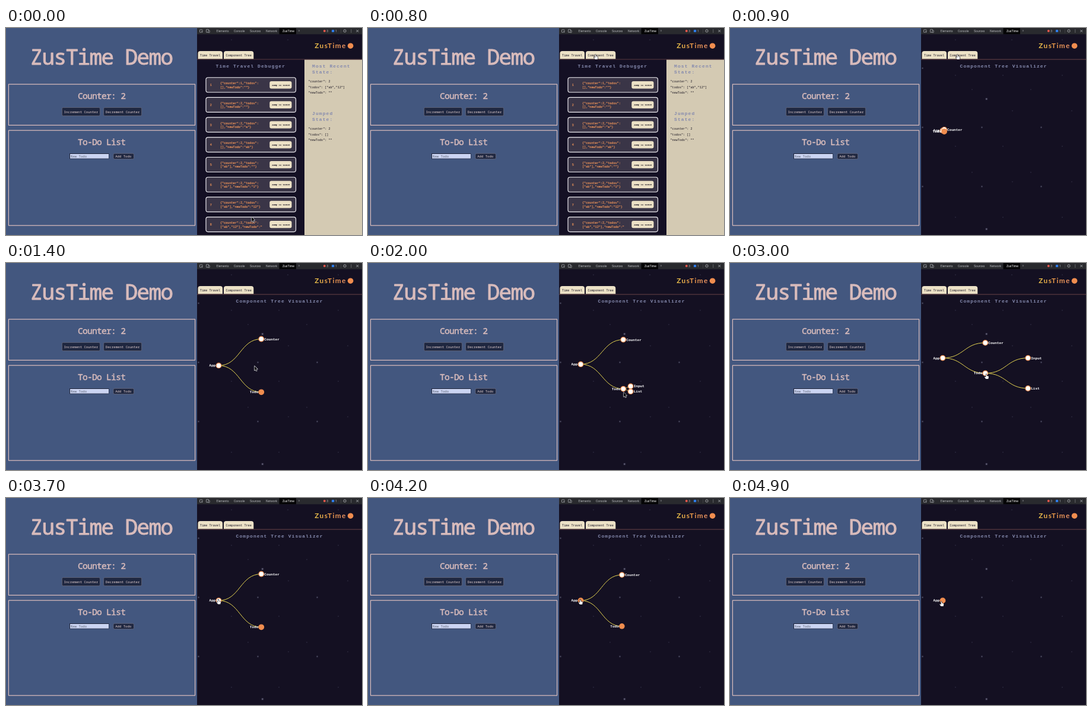
These frames come from a looping animation (600x350 px, 5 s). An HTML page with a canvas:

```html
<!DOCTYPE html>
<html lang="en">
<head>
<meta charset="utf-8">
<title>ZusTime Demo</title>
<style>
  html, body { margin: 0; width: 100%; height: 100%; overflow: hidden; background: #43577f; }
  canvas { display: block; width: 600px; height: 350px; }
</style>
</head>
<body>
<canvas id="stage"></canvas>
<script>
const LOOP = 5000, SWITCH = 850, MOVE = 500;
const MONO = '"Noto Sans Mono", monospace';
const COURIER = '"Liberation Mono", monospace';
const SANS = 'Roboto, sans-serif';
const PINK = '#d9bcbc', CREAM = '#ece1c6', ORANGE = '#f08d4f', NIGHT = '#141022', HEAD = '#858aae';

const canvas = document.getElementById('stage');
const ctx = canvas.getContext('2d');
const dpr = window.devicePixelRatio || 1;
canvas.width = 600 * dpr;
canvas.height = 350 * dpr;

function rect(x, y, w, h, fill) {
  ctx.fillStyle = fill;
  ctx.fillRect(x, y, w, h);
}

function box(x, y, w, h, r, fill, stroke, line = 1) {
  ctx.beginPath();
  ctx.roundRect(x, y, w, h, r);
  if (fill) { ctx.fillStyle = fill; ctx.fill(); }
  if (stroke) { ctx.strokeStyle = stroke; ctx.lineWidth = line; ctx.stroke(); }
}

function dot(x, y, r, fill, stroke) {
  ctx.beginPath();
  ctx.arc(x, y, r, 0, Math.PI * 2);
  ctx.fillStyle = fill;
  ctx.fill();
  if (stroke) { ctx.strokeStyle = stroke; ctx.lineWidth = 1.2; ctx.stroke(); }
}

// `thick` outlines the glyphs for weights between regular and bold
function text(str, x, y, font, fill, { align = 'left', gap = 0, thick = 0 } = {}) {
  ctx.font = font;
  ctx.textAlign = align;
  ctx.letterSpacing = gap + 'px';
  ctx.fillStyle = fill;
  ctx.fillText(str, x, y);
  if (!thick) return;
  ctx.lineJoin = 'round';
  ctx.lineWidth = thick;
  ctx.strokeStyle = fill;
  ctx.strokeText(str, x, y);
}

function path(points, x, y, fill, stroke) {
  ctx.beginPath();
  points.forEach(([px, py]) => ctx.lineTo(x + px, y + py));
  ctx.closePath();
  ctx.lineJoin = 'round';
  ctx.strokeStyle = stroke;
  ctx.lineWidth = 1.2;
  ctx.stroke();
  ctx.fillStyle = fill;
  ctx.fill();
}

// Demo page

function pageButton(label, x, y, w, h) {
  box(x, y, w, h, 2, '#1f2740', '#66687a', 0.8);
  text(label, x + 3.2, y + h / 2 + 2, '5.65px ' + MONO, '#e2cfcf');
}

function section(label, y, h) {
  box(4.4, y, 314.2, h, 0, null, PINK, 1.2);
  text(label, 121, y + 25.3, '14.6px ' + MONO, PINK, { gap: -0.74, thick: 0.45 });
}

function drawPage() {
  rect(0, 0, 322, 350, '#43577f');
  text('ZusTime Demo', 40.5, 61.8, '36px ' + MONO, PINK, { gap: -1.6, thick: 0.9 });
  section('Counter: 2', 95.1, 69.2);
  pageButton('Increment Counter', 94.4, 134.5, 64, 14);
  pageButton('Decrement Counter', 164.6, 134.5, 64, 14);
  section('To-Do List', 173.1, 160.7);
  rect(107, 212, 66.5, 9.3, '#20263c');
  rect(108, 213, 65, 7.6, '#cbd4f2');
  text('New Todo', 109, 219, '5.65px ' + MONO, '#5f6678');
  pageButton('Add Todo', 181, 212.2, 34.5, 9.4);
}

// Panel frame

function drawToolbar() {
  rect(322, 0, 278, 10.5, '#292a2e');
  rect(460.5, 0, 28.5, 10.5, '#050506');
  const font = '5.1px ' + SANS, grey = '#b4b6ba';
  [['Elements', 354.5], ['Console', 384], ['Sources', 411], ['Network', 438]]
    .forEach(([label, x]) => text(label, x, 6.8, font, grey));
  text('ZusTime', 466, 6.8, font, '#ffffff');
  text('»', 492.3, 6.8, '6.5px ' + SANS, '#85878b');
  box(326.5, 2.8, 4.5, 4.5, 0.5, null, grey, 0.7);
  path([[0, 0], [2.6, 1], [1, 2.6]], 329.2, 5.2, grey, '#292a2e');
  box(337.5, 2.4, 4, 5, 0.5, null, grey, 0.7);
  box(340.8, 4, 2.4, 3.7, 0.5, '#292a2e', grey, 0.7);
  dot(536.8, 5, 2, '#e4584c');
  text('3', 540.3, 6.8, font, grey);
  box(549, 3, 4.2, 4, 0.6, '#2f7be6');
  text('1', 555, 6.8, font, grey);
  rect(564, 2, 0.6, 6.5, '#4a4b50');
  ctx.setLineDash([0.8, 0.75]);
  box(569, 2.9, 4, 4, 2, null, grey, 1.5);
  ctx.setLineDash([]);
  [3, 5, 7].forEach(y => dot(581.8, y, 0.55, grey));
  ctx.strokeStyle = grey;
  ctx.lineWidth = 0.8;
  ctx.beginPath();
  ctx.moveTo(590.3, 3); ctx.lineTo(594.3, 7);
  ctx.moveTo(594.3, 3); ctx.lineTo(590.3, 7);
  ctx.stroke();
}

function drawHeader() {
  const glow = ctx.createLinearGradient(520, 0, 575, 0);
  glow.addColorStop(0, '#e6c04a');
  glow.addColorStop(0.5, '#ea9648');
  glow.addColorStop(1, '#e58f66');
  text('ZusTime', 520.3, 34.2, 'bold 11.8px Lato, sans-serif', glow, { gap: 1.4 });
  dot(580.6, 30.2, 4.8, ORANGE);
  rect(322, 52.5, 278, 1.2, '#5a3a40');
  [['Time Travel', 323.5, 41.5], ['Component Tree', 367, 50.3]].forEach(([label, x, w]) => {
    box(x, 39, w, 13.2, [4, 4, 0, 0], CREAM);
    text(label, x + 3.6, 47.5, '5.15px ' + COURIER, '#191525');
  });
}

const star = (x, y, r, c) => dot(x, y, r, c);

function drawStars(bottom) {
  for (let row = 0; 20 + row * 60 < bottom; row++) {
    const y = 20 + row * 60;
    (row % 2 ? [380, 460, 560] : row ? [476, 576] : [380, 475, 560])
      .forEach(x => star(x, y, 0.8, '#38354b'));
  }
  if (bottom < 100) return;
  for (let y = 68; y < 350; y += 100)
    for (let x = 324.5; x < 600; x += 100) {
      if (y === 68 && x > 330) continue;
      star(x, y, 1.8, '#272439');
      star(x, y, 0.8, '#666579');
    }
  [104, 244].forEach(y => [408, 507].forEach(x => star(x, y, 0.8, '#38354b')));
  [120, 340].forEach(y => { star(432.3, y, 2.2, '#2c293f'); star(432.3, y, 1, '#747286'); });
}

// Time travel view

const STATES = [
  [1, '[],"newTodo":""}'], [2, '[],"newTodo":""}'], [2, '[],"newTodo":"a"}'],
  [2, '[],"newTodo":"ab"}'], [2, '["ab"],"newTodo":""}'], [2, '["ab"],"newTodo":"1"}'],
  [2, '["ab"],"newTodo":"12"}'], [2, '["ab","12"],"newTodo":"']
];

function title(str, x, y) {
  text(str, x, y, 'bold 8px ' + COURIER, HEAD, { gap: 1.08 });
}

function drawSummary(name, todos, y) {
  title(name, 516, y);
  title('State:', 516, y + 9.6);
  ['"counter": 2', '"todos": ' + todos, '"newTodo": ""'].forEach((line, i) =>
    text(line, 509.5, y + 24.6 + i * 9.7, '5.15px ' + COURIER, '#1b1722'));
}

function drawHistory() {
  rect(322, 53.7, 181, 297, '#141024');
  rect(503, 53.7, 97, 297, '#d4cab3');
  title('Time Travel Debugger', 353.5, 67.3);
  STATES.forEach(([count, rest], i) => {
    const y = 83.7 + i * 33.7;
    const code = (str, x, dy) =>
      text(str, x, y + dy, '5.15px ' + COURIER, '#f2965a', { thick: 0.15 });
    box(337, y, 151.5, 25, 3.5, '#3a3547', '#f1eff4', 1.15);
    code(String(i + 1), 343.8, 14.6);
    code(`{"counter":${count},"todos":`, 361, 11.5);
    code(rest, 361, 17.9);
    box(444.3, y + 6.4, 37.2, 12.3, 3, CREAM);
    text('Jump to state', 447.8, y + 14, '3.9px ' + COURIER, '#1d1824', { thick: 0.15 });
  });
  drawSummary('Most Recent', '["ab","12"]', 67.3);
  drawSummary('Jumped', '[]', 147.3);
}

// Component tree view

const PARENT = { Counter: 'App', Todo: 'App', Input: 'Todo', List: 'Todo' };
const NAMES = ['App', 'Counter', 'Todo', 'Input', 'List'];
const CLOSED = { App: [358.5, 173.4] };
const HALF = { App: [358.5, 173.4], Counter: [430.3, 128.5], Todo: [430.3, 218.3] };
const FULL = {
  App: [358.5, 160.6], Counter: [430.3, 134.9], Todo: [430.3, 186.4],
  Input: [502.2, 160.6], List: [502.2, 212]
};
const STEPS = [
  { at: 797, from: CLOSED, to: HALF, source: 'App' },
  { at: 1826, from: HALF, to: FULL, source: 'Todo' },
  { at: 3050, from: FULL, to: HALF, source: 'Todo' },
  { at: 4100, from: HALF, to: CLOSED, source: 'App' }
];

const clamp = v => Math.min(1, Math.max(0, v));
const mix = (a, b, k) => a + (b - a) * k;
const cubic = t => t < 0.5 ? 4 * t ** 3 : 1 - 4 * (1 - t) ** 3;

function treeAt(t) {
  const { at, from, to, source } = STEPS.filter(s => s.at <= t).pop() || STEPS[0];
  const k = cubic(clamp((t - at) / MOVE)), nodes = {};
  for (const name of NAMES) {
    if (!to[name] && (!from[name] || k >= 1)) continue;
    const a = from[name] || from[source], b = to[name] || to[source];
    const kids = NAMES.filter(n => PARENT[n] === name);
    nodes[name] = {
      x: mix(a[0], b[0], k), y: mix(a[1], b[1], k),
      show: to[name] ? 1 : 1 - k,
      parent: kids.length > 0,
      folded: kids.length > 0 && !to[kids[0]]
    };
  }
  return nodes;
}

function drawTree(nodes) {
  title('Component Tree Visualizer', 387.5, 67.3);
  ctx.strokeStyle = '#e5d451';
  ctx.lineWidth = 1;
  for (const name in nodes) {
    const a = nodes[PARENT[name]], b = nodes[name];
    if (!a) continue;
    const mid = (a.x + b.x) / 2;
    ctx.beginPath();
    ctx.moveTo(a.x, a.y);
    ctx.bezierCurveTo(mid, a.y, mid, b.y, b.x, b.y);
    ctx.stroke();
  }
  for (const name in nodes) {
    const { x, y, show, parent, folded } = nodes[name];
    dot(x, y, 4.3 * show, folded ? ORANGE : '#ffffff', ORANGE);
    ctx.globalAlpha = show;
    text(name, parent ? x - 5 : x + 5, y + 2, 'bold 6.1px ' + COURIER, '#ffffff',
      { align: parent ? 'right' : 'left' });
    ctx.globalAlpha = 1;
  }
}

// Pointer

const TRACK = [
  [100, 414, 319.5], [700, 383.5, 45], [1000, 383.5, 45], [1600, 431, 218.8], [2450, 431, 218.8],
  [2900, 432, 188], [3150, 432, 188], [3650, 358, 171.5], [4150, 358, 171.5], [4400, 356.3, 175]
];
const ARROW = [[0, 0], [0, 7.4], [1.7, 5.9], [2.9, 8.6], [4.1, 8.1], [2.9, 5.4], [5.2, 5.3]];
const HAND = [[-0.7, 0], [0.5, 0], [0.7, 2.8], [3.6, 3.5], [4, 4.6], [3.3, 8], [-0.8, 8],
  [-3, 5], [-2.5, 4.3], [-0.7, 5.2]];

function pointerAt(t) {
  const i = TRACK.findIndex(p => p[0] > t);
  if (i === 0) return TRACK[0].slice(1);
  if (i < 0) return TRACK[TRACK.length - 1].slice(1);
  const [t0, x0, y0] = TRACK[i - 1], [t1, x1, y1] = TRACK[i];
  const u = (t - t0) / (t1 - t0), k = u * u * (3 - 2 * u);
  return [mix(x0, x1, k), mix(y0, y1, k)];
}

function drawPointer(t, nodes) {
  const [x, y] = pointerAt(t);
  const onTab = y > 39 && y < 52 && x > 323 && x < 417;
  const onNode = Object.values(nodes).some(n => Math.hypot(n.x - x, n.y - y) < 5);
  if (onTab || onNode) path(HAND, x, y, '#ffffff', '#16141c');
  else path(ARROW, x, y, '#0b0b0e', '#e8e8ec');
}

function draw(t) {
  const tree = t >= SWITCH, nodes = tree ? treeAt(t) : {};
  ctx.setTransform(dpr, 0, 0, dpr, 0, 0);
  drawPage();
  rect(322, 0, 278, 350, NIGHT);
  drawStars(tree ? 350 : 50);
  drawToolbar();
  drawHeader();
  if (tree) drawTree(nodes);
  else drawHistory();
  drawPointer(t, nodes);
}

const start = performance.now();
function tick() {
  draw((performance.now() - start) % LOOP);
  requestAnimationFrame(tick);
}
tick();
</script>
</body>
</html>
```
